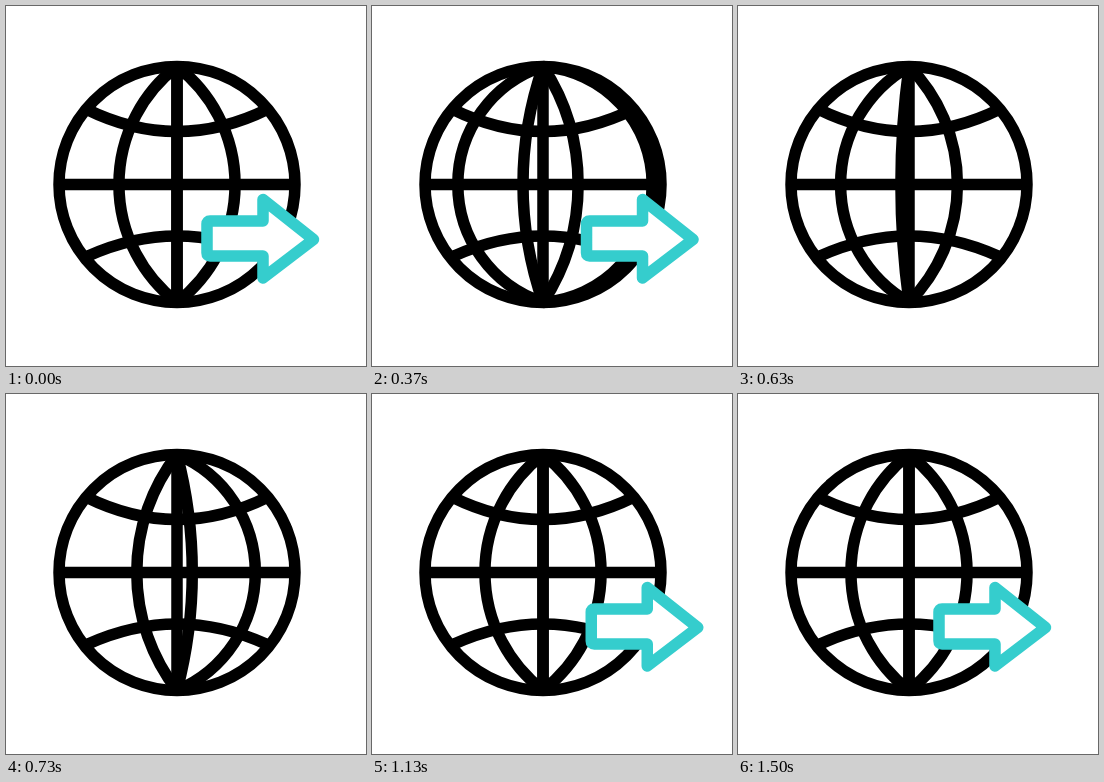
An HTML page that plays this animation: 360 px wide and 360 px high, repeating every 1670 ms.

```html
<!DOCTYPE html>
<html lang="en">
<head>
<meta charset="utf-8">
<title>Globe and arrow</title>
<style>
  html, body { margin: 0; width: 100%; height: 100%; overflow: hidden; background: #fff; }
  svg { display: block; width: 100vw; height: 100vh; }
  .globe { fill: none; stroke: #000; stroke-width: 11.5; }
  .arrow { fill: #fff; stroke: #35cdcd; stroke-width: 11.5; stroke-linejoin: round; }
</style>
</head>
<body>
<svg viewBox="0 0 360 360">
  <g class="globe">
    <circle cx="171" cy="178.400" r="118"/>
    <path d="M53 178.500H289M171 60V296"/>
    <path d="M80 103Q171 148 262 103M82 250Q171 210 260 250"/>
    <path id="meridians"/>
  </g>
  <path id="arrow" class="arrow" d="M204 215H257V193.500L307.500 233.500L257 272V250H204Q201 250 201 247V218Q201 215 204 215Z"/>
</svg>
<script>
const LOOP = 1670, STEP = 100 / 3;
const CX = 171, CY = 178.4, R = 118;
const SPACING = 52.4 * Math.PI / 180;
const meridians = document.getElementById('meridians');
const arrow = document.getElementById('arrow');

const linear = p => p;
const easeIn = p => p * p;
const easeOut = p => 1 - (1 - p) ** 1.7;
const easeInOut = p => (1 - Math.cos(Math.PI * p)) / 2;

// Rows: start, end, from, to, easing
const SLIDE = [
  [0, 200, 0, -40, easeInOut],
  [200, 680, -40, 404, easeIn],
  [730, 1180, -385, 27, easeOut],
  [1180, 1500, 27, 0, easeInOut]
];
const SPIN = [
  [233, 533, 0, 1.42, linear],
  [533, 733, 1.42, 2.28, linear],
  [733, 900, 2.28, 3, linear]
];

function valueAt(track, t) {
  let value = track[0][2];
  for (const [start, end, from, to, ease] of track) {
    if (t < start) break;
    value = from + (to - from) * ease(Math.min(1, (t - start) / (end - start)));
  }
  return value;
}

// Stereographic meridian: a circular arc through both poles
function meridian(slot) {
  const angle = slot * SPACING;
  if (Math.abs(angle) >= Math.PI / 2) return '';
  const top = `M${CX} ${CY - R}`, bottom = `${CX} ${CY + R}`;
  if (Math.abs(angle) < 0.001) return `${top}L${bottom}`;
  const r = R / Math.abs(Math.sin(angle));
  return `${top}A${r} ${r} 0 0 ${angle > 0 ? 1 : 0} ${bottom}`;
}

function draw(time) {
  const t = Math.floor((time % LOOP + 4) / STEP) * STEP;
  const turn = valueAt(SPIN, t) % 1;
  meridians.setAttribute('d', [-2, -1, 0, 1].map(k => meridian(k + turn)).join(''));
  arrow.setAttribute('transform', `translate(${valueAt(SLIDE, t)} 0)`);
}

const begin = performance.now();
function tick() {
  draw(performance.now() - begin);
  requestAnimationFrame(tick);
}
tick();
</script>
</body>
</html>
```
